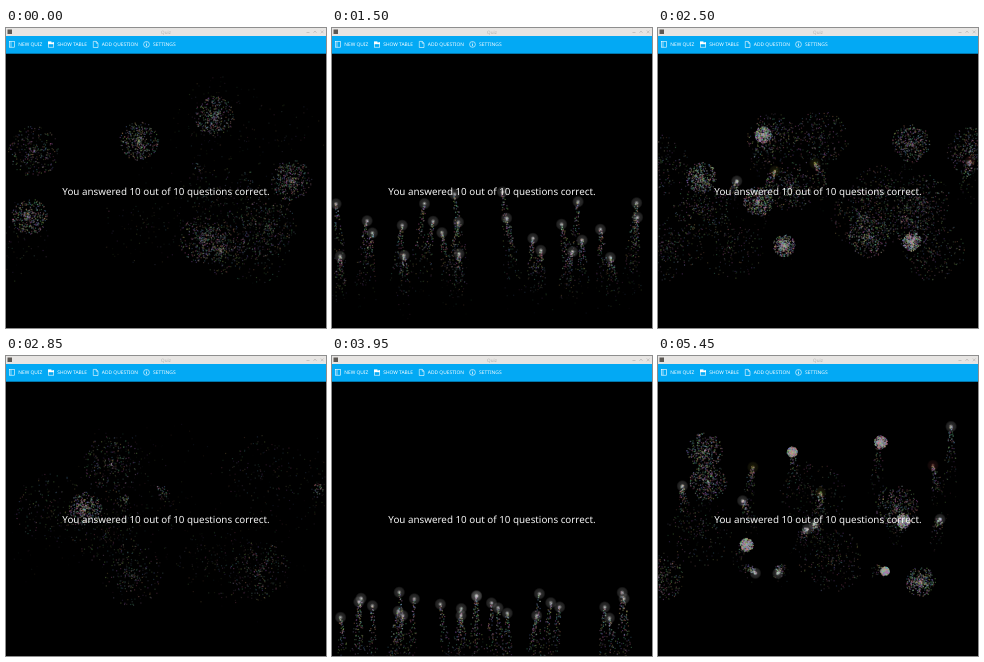
Recreate the animation shown at these times as an HTML page with a canvas. Size 320 px wide and 300 px high, loop 5.5 s.

```html
<!DOCTYPE html>
<html lang="en">
<head>
<meta charset="utf-8">
<title>Quiz</title>
<style>
html, body { margin: 0; width: 100%; height: 100%; overflow: hidden; background: #000; }
canvas { display: block; width: 320px; height: 300px; }
</style>
</head>
<body>
<canvas id="stage"></canvas>
<script>
const W = 320, H = 300, LOOP = 5500, STEP = 50;
const LAUNCH = 0.55, GROUND = 300, VOLLEY_LENGTH = 3.8, PER_BATTERY = 4;
const canvas = document.getElementById('stage');
const dpr = window.devicePixelRatio || 1;
canvas.width = W * dpr;
canvas.height = H * dpr;
const ctx = canvas.getContext('2d');
ctx.textRendering = 'geometricPrecision';

function rng(seed) {
  return () => {
    seed = (seed + 0x6D2B79F5) | 0;
    let v = Math.imul(seed ^ (seed >>> 15), 1 | seed);
    v = (v + Math.imul(v ^ (v >>> 7), 61 | v)) ^ v;
    return ((v ^ (v >>> 14)) >>> 0) / 4294967296;
  };
}

const palette = Array.from({ length: 18 }, (_, i) =>
  `hsl(${i * 20}, ${i % 3 ? 55 : 25}%, 62%)`);

function makeDots(rand, count, build) {
  return Array.from({ length: count }, (_, i) => ({
    color: palette[Math.floor(rand() * palette.length)],
    ...build(i)
  }));
}

// Strong rockets climb fast and high, weak ones stall near the ground.
function makeRocket(rand, x0, power, dud) {
  const drift = (rand() - 0.5) * 36;
  const speed = 110 + 60 * power, drag = 80 - 30 * power;
  const fuse = dud ? 2.1 : 1.25 + 0.9 * rand();
  const at = s => ({ x: x0 + drift * s, y: GROUND - speed * s + drag * s * s / 2 });

  const sparks = makeDots(rand, Math.floor(fuse * 150), i => ({
    born: i / 150, ...at(i / 150),
    dx: rand() - 0.5, dy: rand() - 0.5, life: 0.35 + rand() * 0.4
  }));
  const shards = dud ? [] : makeDots(rand, 320, () => {
    const angle = rand() * Math.PI * 2, v = 58 * Math.pow(rand(), 0.75);
    return { vx: Math.cos(angle) * v, vy: Math.sin(angle) * v, life: 0.4 + rand() * 0.5 };
  });
  return { at, fuse, dud, sparks, shards };
}

// Each battery fires its rockets from around one place on the ground.
function makeVolley(start, seed, batteries) {
  const rand = rng(seed);
  const rockets = batteries.flatMap((x, b) =>
    Array.from({ length: PER_BATTERY }, (_, k) => {
      const x0 = x + (k - 1.5) * 8 + (rand() - 0.5) * 6;
      const power = ((k * 3 + b) % PER_BATTERY + rand()) / PER_BATTERY;
      const dud = power > 0.4 && (b + k) % 4 === 0;
      return makeRocket(rand, x0, power, dud);
    }));
  return { start, rockets };
}

const volleys = [
  makeVolley(-3, 41, [5, 155, 180, 215, 245, 282]),
  makeVolley(0, 17, [18, 75, 126, 196, 238, 288]),
  makeVolley(3, 29, [25, 70, 128, 162, 208, 285])
];

function dot(x, y, color, alpha) {
  ctx.globalAlpha = alpha;
  ctx.fillStyle = color;
  ctx.fillRect(x - 0.6, y - 0.6, 1.2, 1.2);
}

function drawTrail(rocket, s) {
  for (const p of rocket.sparks) {
    const age = s - p.born;
    if (age < 0 || age >= p.life) continue;
    const spread = 2 + 24 * age;
    dot(p.x + p.dx * spread, p.y + p.dy * spread + 14 * age * age, p.color,
        0.5 * Math.pow(1 - age / p.life, 0.6));
  }
}

function drawBurst(rocket, s) {
  const age = s - rocket.fuse;
  if (age < 0) return;
  const { x, y } = rocket.at(rocket.fuse);
  for (const p of rocket.shards) {
    if (age >= p.life) continue;
    dot(x + p.vx * age, y + p.vy * age + 6 * age * age, p.color,
        0.55 * Math.pow(1 - age / p.life, 0.6));
  }
}

function drawHead(rocket, s) {
  if (s >= rocket.fuse) return;
  const { x, y } = rocket.at(s);
  const fading = rocket.dud && s > 1.65;
  const rgb = !fading ? '215,215,215' : x > 240 ? '170,75,75' : '150,145,50';
  const glow = ctx.createRadialGradient(x, y, 0, x, y, 6);
  glow.addColorStop(0, `rgba(${rgb},0.75)`);
  glow.addColorStop(0.25, `rgba(${rgb},0.4)`);
  glow.addColorStop(0.4, `rgba(${rgb},0.2)`);
  glow.addColorStop(0.75, `rgba(${rgb},0.15)`);
  glow.addColorStop(1, `rgba(${rgb},0)`);
  ctx.globalAlpha = fading ? 0.7 : 1;
  ctx.fillStyle = glow;
  ctx.fillRect(x - 6, y - 6, 12, 12);
}

function drawVolley(volley, t) {
  const local = t - volley.start;
  if (local < LAUNCH || local > VOLLEY_LENGTH) return;
  const s = local - LAUNCH;
  for (const rocket of volley.rockets) {
    drawTrail(rocket, s);
    drawBurst(rocket, s);
    drawHead(rocket, s);
  }
}

function label(text, x, y, size, color, align = 'left') {
  ctx.font = `${size}px "Noto Sans", sans-serif`;
  ctx.textAlign = align;
  ctx.fillStyle = color;
  ctx.fillText(text, x, y);
}

function line(...pts) {
  ctx.beginPath();
  for (let i = 0; i < pts.length; i += 2) ctx.lineTo(pts[i], pts[i + 1]);
  ctx.stroke();
}

function drawTitleBar() {
  ctx.fillStyle = '#e7e5e3';
  ctx.fillRect(0, 0, W, 8);
  ctx.fillStyle = '#5c5854';
  ctx.fillRect(1.5, 1.5, 4.5, 4.5);
  label('Quiz', 160, 5.6, 4.6, '#b0aeac', 'center');
  ctx.strokeStyle = '#b0aeac';
  ctx.lineWidth = 0.6;
  line(300.5, 4.5, 303.5, 4.5);
  line(307.5, 4.8, 309, 3, 310.5, 4.8);
  line(314.8, 2.5, 317.6, 5.3);
  line(317.6, 2.5, 314.8, 5.3);
}

function drawToolbar() {
  ctx.fillStyle = '#03a9f4';
  ctx.fillRect(0, 8, W, 17.7);
  ctx.strokeStyle = ctx.fillStyle = '#fff';
  ctx.lineWidth = 0.6;
  ctx.strokeRect(3.4, 13.6, 5.2, 5.6);
  line(5, 13.6, 5, 19.2);
  ctx.strokeRect(42.3, 14.4, 5.4, 4.8);
  ctx.fillRect(42, 13.4, 3.4, 2.6);
  ctx.fillRect(42, 15, 6, 1.2);
  line(87.3, 13.4, 90.2, 13.4, 92, 15.2, 92, 19.5, 87.3, 19.5, 87.3, 13.4);
  line(90.2, 13.4, 90.2, 15.2, 92, 15.2);
  ctx.beginPath();
  ctx.arc(140.5, 16.4, 2.9, 0, Math.PI * 2);
  ctx.stroke();
  ctx.fillRect(140.15, 14.6, 0.7, 0.7);
  ctx.fillRect(140.15, 15.8, 0.7, 2.4);
  label('NEW QUIZ', 12.2, 18.3, 4.9, '#fff');
  label('SHOW TABLE', 51.2, 18.3, 4.9, '#fff');
  label('ADD QUESTION', 95.8, 18.3, 4.9, '#fff');
  label('SETTINGS', 147, 18.3, 4.9, '#fff');
}

function draw(t) {
  ctx.setTransform(dpr, 0, 0, dpr, 0, 0);
  ctx.globalAlpha = 1;
  ctx.fillStyle = '#000';
  ctx.fillRect(0, 0, W, H);
  for (const volley of volleys) drawVolley(volley, t);
  ctx.globalAlpha = 1;
  label('You answered 10 out of 10 questions correct.', 160, 167, 9.82, '#f4f4f4', 'center');
  drawTitleBar();
  drawToolbar();
}

const start = performance.now();
function tick() {
  const t = (performance.now() - start) % LOOP;
  draw(Math.floor(t / STEP) * STEP / 1000);
  requestAnimationFrame(tick);
}
tick();
</script>
</body>
</html>
```
